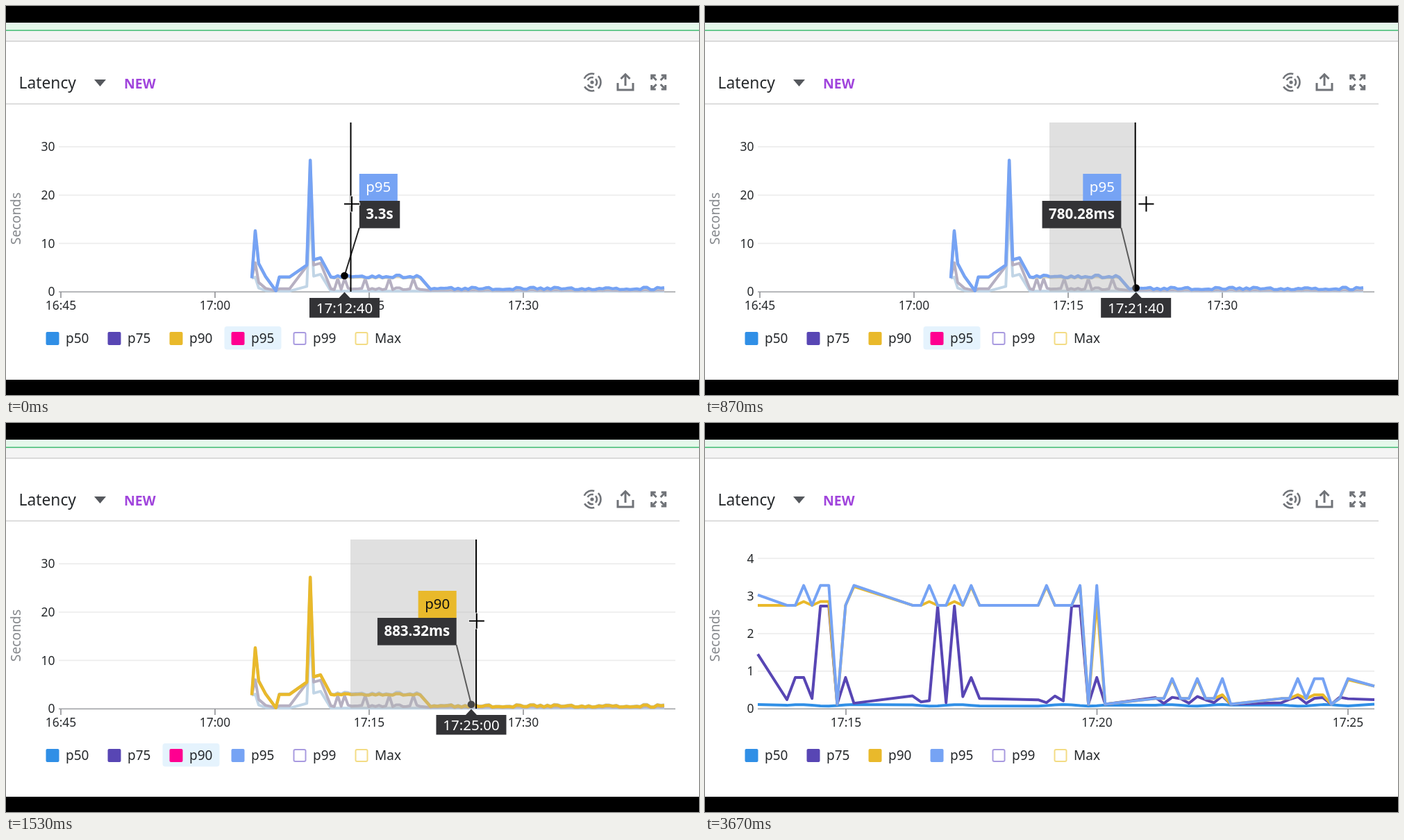
Recreate the animation shown at these times as an HTML page with a canvas. Size 998 px wide and 561 px high, loop 4270 ms.

```html
<!DOCTYPE html>
<html lang="en">
<head>
<meta charset="utf-8">
<title>Latency chart</title>
<style>
  html, body { margin: 0; width: 100%; height: 100%; overflow: hidden; background: #fff; }
  canvas { display: block; width: 998px; height: 561px; }
</style>
</head>
<body>
<canvas id="stage" width="998" height="561"></canvas>
<script>
const ctx = document.getElementById('stage').getContext('2d');
const LOOP = 4270, FRAME = 200 / 3;
const DRAG_AT = 600, RELABEL_AT = 1130, SPIN_AT = 2930, LEAVE_AT = 3470, ZOOM_AT = 3670;
const BASE = 412, BAND_LEFT = 496, SECOND_Y = 6.97, MINUTE_X = 14.8;
const FONT = '"Noto Sans", "Open Sans", sans-serif';
const INK = '#25282b', ICON = '#707378', DARK = '#333336';
const COLORS = { p50: '#308fe6', p75: '#5846b4', p90: '#e9b92b', p95: '#76a3f4' };
const DIM = { p50: '#c1d5e6', p75: '#b6b0c2', p90: '#d8d2ba', p95: '#b9cbe0' };
const LEAVING = { p50: '#7aaedf', p75: '#8a80b2', p90: '#e9b92b', p95: '#93b3de' };

// Overview: one point per 20 s. Two spikes, a plateau and a quiet tail.
function overview({ first, second, shoulder, floor, rise, body, tail }) {
  const head = [[0, 2.8], [1, first], [2, floor + first * 0.22], [4, floor + 0.1], [7, 0.2],
    [8, floor], [11, floor], [16, rise], [17, second], [18, shoulder], [20, shoulder + 0.4],
    [23, floor]];
  for (let j = 24; j <= 120; j++) {
    if (j <= 49) head.push([j, body(j)]);
    else if (j >= 52) head.push([j, tail(j)]);
  }
  return head.map(([j, value]) => [354 + j * 4.95, BASE - value * SECOND_Y]);
}
const wobble = (j, mid, amount) => mid + amount * Math.sin(j * j * 1.7);
const slow = { first: 12.6, second: 27.2, shoulder: 6.6, rise: 5.5 };
const OVERVIEW = {
  p50: overview({ first: 3, second: 17, shoulder: 3.2, floor: 0.12, rise: 1.1,
    body: () => 0.12, tail: () => 0.12 }),
  p75: overview({ first: 6, second: 23, shoulder: 5.5, floor: 0.6, rise: 5.3,
    body: j => [25, 27, 33, 40, 47].includes(j) ? 2.7 : wobble(j, 0.6, 0.2),
    tail: j => wobble(j, 0.3, 0.1) }),
  p90: overview({ ...slow, floor: 2.95,
    body: j => wobble(j, 2.95, 0.15), tail: j => wobble(j, 0.55, 0.22) }),
  p95: overview({ ...slow, floor: 3.05,
    body: j => wobble(j, 3.15, 0.25), tail: j => wobble(j, 0.65, 0.25) })
};

// Detail: one point per 10 s, in bursts that repeat every 15 points.
function detail(value, first, last) {
  const points = [[76, first]];
  for (let i = 0; i < 68; i++) {
    const calm = i > 40 ? 1 : 0;
    if ((i + calm) % 15 < 9 + calm) points.push([118 + i * 12.06, value(i)]);
  }
  points.push([964, last]);
  return points.map(([x, v]) => [x, BASE - v * 54.2]);
}
const dips = [6, 36, 38, 53, 65];
const peaks = [2, 4, 5, 8, 17, 20, 22, 31, 35, 37, 46, 49, 52, 61, 63, 64, 67];
const sharedPeaks = [8, 22, 31, 35, 46, 49, 67];
const level = i => i < 38 ? 2.75 : 0.27;
const slowest = (i, lift) => dips.includes(i) ? 0.12 : level(i) + (peaks.includes(i) ? lift : 0);
const DETAIL = {
  p50: detail(i => 0.09 + 0.02 * Math.sin(i), 0.11, 0.12),
  p75: detail(i => {
    if (dips.includes(i)) return 0.12;
    if ([4, 5, 18, 20, 34, 35].includes(i)) return 2.73;
    if ([1, 2, 7, 22, 37].includes(i)) return 0.83;
    return 0.24 + 0.1 * Math.sin(i * 2.2);
  }, 1.45, 0.24),
  p90: detail(i => slowest(i, sharedPeaks.includes(i) ? 0.5 : 0.1), 2.75, 0.6),
  p95: detail(i => slowest(i, 0.53), 3.03, 0.6)
};

function rect(x, y, w, h, color) {
  ctx.fillStyle = color;
  ctx.fillRect(x, y, w, h);
}
function text(str, x, y, size, color = INK, align = 'left', weight = 400) {
  ctx.font = `${weight} ${size}px ${FONT}`;
  ctx.fillStyle = color;
  ctx.textAlign = align;
  ctx.fillText(str, x, y);
}
function line(points, color, width, join = 'round') {
  ctx.beginPath();
  points.forEach(([x, y]) => ctx.lineTo(x, y));
  ctx.strokeStyle = color;
  ctx.lineWidth = width;
  ctx.lineJoin = join;
  ctx.stroke();
}
function arc(x, y, r, from, to, color, width) {
  ctx.beginPath();
  ctx.arc(x, y, r, from * Math.PI / 180, to * Math.PI / 180);
  ctx.strokeStyle = color;
  ctx.lineWidth = width;
  ctx.stroke();
}
function shape(points, color) {
  ctx.beginPath();
  points.forEach(([x, y]) => ctx.lineTo(x, y));
  ctx.fillStyle = color;
  ctx.fill();
}
function disc(x, y, r, color) {
  ctx.beginPath();
  ctx.arc(x, y, r, 0, 7);
  ctx.fillStyle = color;
  ctx.fill();
}

function drawFrame() {
  rect(0, 0, 998, 561, '#fff');
  rect(0, 24, 998, 11, '#e5f8eb');
  rect(0, 34.4, 998, 1.8, '#4fbf7c');
  rect(0, 36.2, 998, 14, '#f4f4f4');
  rect(0, 50, 998, 1.5, '#cfcfcf');
  rect(0, 140.5, 970, 1.5, '#d3d3d3');
  rect(0, 0, 998, 24, '#000');
  rect(0, 539, 998, 22, '#000');
  text('Latency', 18.5, 118.5, 22.8);
  shape([[127, 106], [144, 106], [135.5, 116]], '#55585d');
  text('NEW', 170, 118.5, 19.5, '#a044dc', 'left', 700);
  ctx.save();
  ctx.translate(20.5, 306.5);
  ctx.rotate(-Math.PI / 2);
  text('Seconds', 0, 0, 19.3, '#85888c', 'center');
  ctx.restore();
}

function drawIcons() {
  disc(844, 110, 2.6, ICON);
  for (const r of [7, 12.5]) {
    arc(844, 110, r, -45, 45, ICON, 2.6);
    arc(844, 110, r, 75, 150, ICON, 2.6);
    arc(844, 110, r, 205, 285, ICON, 2.6);
  }
  line([[881, 111], [881, 121], [903, 121], [903, 111]], ICON, 3, 'miter');
  line([[892, 115], [892, 99]], ICON, 3);
  line([[885.5, 105], [892, 98.5], [898.5, 105]], ICON, 3, 'miter');
  for (const sx of [-1, 1]) for (const sy of [-1, 1]) {
    const at = (x, y) => [939.7 + sx * x, 110 + sy * y];
    line([at(4, 10), at(10, 10), at(10, 4)], ICON, 3, 'miter');
    line([at(3, 3), at(9, 9)], ICON, 3);
  }
}

function drawAxes(count, unit, unitY, labels, firstX, gapX) {
  for (let i = 0; i < count; i++) {
    const y = BASE - i * unitY;
    if (i) rect(76, y - 0.7, 888, 1.6, '#ececec');
    text(i * unit, 70.5, y + 6.3, 17.5, INK, 'right');
  }
  rect(76, BASE - 0.5, 888, 1.6, '#a2a4a7');
  labels.forEach((label, i) => {
    const x = firstX + i * gapX;
    rect(x - 0.8, BASE, 1.6, 9, '#8f9195');
    text(label, x, 437.5, 17.4, INK, 'center');
  });
}

function drawLegend(active) {
  ['p50', 'p75', 'p90', 'p95', 'p99', 'Max'].forEach((name, i) => {
    const x = 57.5 + i * 89;
    ctx.beginPath();
    if (name === active) {
      ctx.roundRect(x - 10, 462, 82, 33.5, 4);
      ctx.fillStyle = '#e5f3fd';
      ctx.fill();
      ctx.beginPath();
    }
    if (COLORS[name]) {
      ctx.roundRect(x, 470, 19, 19, 2);
      ctx.fillStyle = name === active ? '#ff0090' : COLORS[name];
      ctx.fill();
    } else {
      ctx.roundRect(x + 1, 471, 17, 17, 2);
      ctx.strokeStyle = name === 'Max' ? '#f3dc85' : '#a99be0';
      ctx.lineWidth = 2;
      ctx.stroke();
    }
    text(name, x + 28.5, 486, 19);
  });
}

function drawSeries(data, colors, top) {
  const names = Object.keys(data).filter(name => name !== top);
  for (const name of names) line(data[name], colors[name], 4);
  if (top) line(data[top], COLORS[top], 4.5);
}

const glide = (t, from, to, start, tau) =>
  to + (from - to) * Math.exp(-Math.max(0, t - start) / tau);

// Snap to the latest sample; samples come in runs with gaps between them.
function sampleAt(x) {
  const near = Math.floor(((x - 300) * 60 / MINUTE_X + 10) / 20) * 20;
  const late = Math.max(0, (near - 670) % 150 - 90);
  return Math.floor((near - late) / 20) * 20;
}
function readout(seconds) {
  if (seconds < 900) return ['p95', 3.3];
  if (seconds < 1200) return ['p90', 2.74];
  return seconds < 1500 ? ['p95', 0.78028] : ['p90', 0.88332];
}

function drawHover(t) {
  const time = Math.floor((t - DRAG_AT + 4) / FRAME) * FRAME + DRAG_AT;
  const cursorX = glide(time, 498, 679, 606, 183), cursorY = 285.5;
  const lineX = glide(time, 496.5, 678, 685, 160);
  const seconds = sampleAt(lineX);
  const [name, value] = readout(seconds);
  const dotX = 300 + seconds * MINUTE_X / 60, dotY = BASE - value * SECOND_Y;
  const side = t < DRAG_AT ? 1 : -1;
  const edge = dotX + side * 21.3;

  line([[dotX, dotY], [edge, 320]], '#222', 2);
  disc(dotX, dotY, 5.3, '#000');
  if (t >= DRAG_AT && t < SPIN_AT) {
    rect(BAND_LEFT, 168, lineX - BAND_LEFT, 244, 'rgba(177,177,177,.4)');
  }
  rect(lineX - 1, 168, 2, 244, '#000');

  const box = (str, y, fill, ink, weight) => {
    ctx.font = `${weight} 20.5px ${FONT}`;
    const w = ctx.measureText(str).width + 19;
    const x = side > 0 ? edge : edge - w;
    rect(x, y, w, 39.5, fill);
    text(str, x + 9.5, y + 26, 20.5, ink, 'left', weight);
  };
  const valueText = value < 1 ? (value * 1000).toFixed(2) + 'ms' : value + 's';
  box(name, 242, COLORS[name], name === 'p95' ? '#fff' : '#111', 400);
  box(valueText, 281, DARK, '#fff', 700);

  const pad = n => String(n).padStart(2, '0');
  rect(dotX - 50.5, 421, 101, 28.5, DARK);
  shape([[dotX - 8.5, 421.5], [dotX, 412.5], [dotX + 8.5, 421.5]], DARK);
  text(`17:${pad(Math.floor(seconds / 60))}:${pad(seconds % 60)}`, dotX, 442.5, 20.5, '#fff', 'center');

  for (const [color, width, arm] of [['rgba(255,255,255,.8)', 4.5, 12], ['#000', 2, 11]]) {
    line([[cursorX - arm, cursorY], [cursorX + arm, cursorY]], color, width);
    line([[cursorX, cursorY - arm], [cursorX, cursorY + arm]], color, width);
  }
}

function drawSpinner(t) {
  const from = -90 + Math.floor((t - SPIN_AT) / 67.5 + 0.01) * 33.75;
  arc(799, 110, 11.7, 0, 360, '#c3c3c5', 4.5);
  arc(799, 110, 11.7, from, from + 90, '#34363b', 4.5);
}

function draw(t) {
  drawFrame();
  drawIcons();
  if (t >= ZOOM_AT) {
    drawAxes(5, 1, 54.2, ['17:15', '17:20', '17:25'], 203, 361.5);
    drawLegend();
    drawSeries(DETAIL, COLORS);
    return;
  }
  const active = t < RELABEL_AT ? 'p95' : 'p90';
  drawAxes(4, 10, 69.7, ['16:45', '17:00', '17:15', '17:30'], 79, 222);
  drawLegend(active);
  drawSeries(OVERVIEW, t < LEAVE_AT ? DIM : LEAVING, active);
  if (t < LEAVE_AT) drawHover(t);
  if (t >= SPIN_AT) drawSpinner(t);
}

const start = performance.now();
function tick() {
  draw((performance.now() - start) % LOOP);
  requestAnimationFrame(tick);
}
tick();
</script>
</body>
</html>
```
